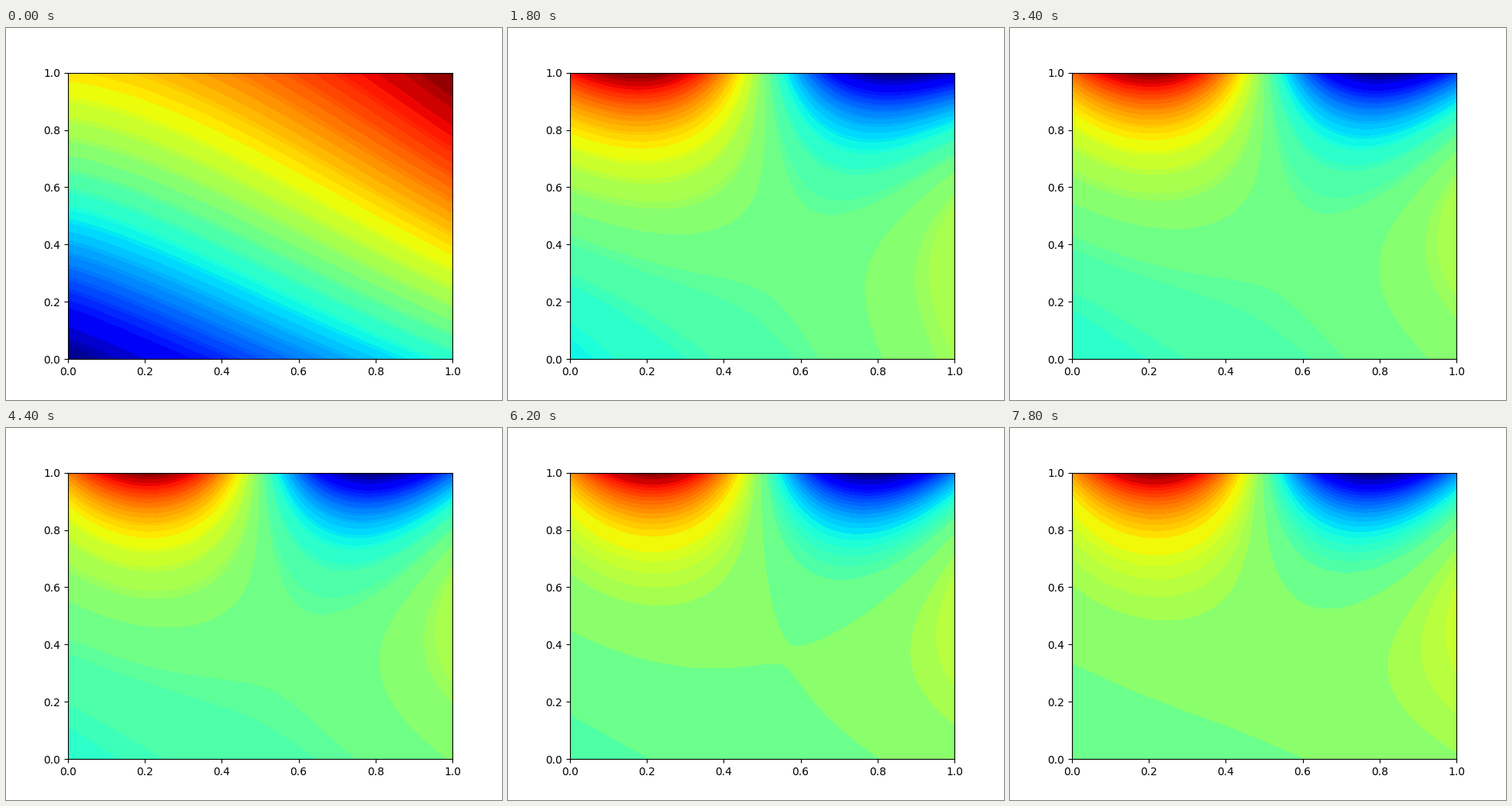
A matplotlib script that plays this animation: 640x480 px, repeating every 8 s.

```python
from itertools import groupby

import numpy as np
import matplotlib.pyplot as plt
from matplotlib.animation import FuncAnimation

STEP = 200          # ms per frame
FRAMES = 40
TILT_END = 600      # the diagonal ramp has swung round
LOBES_START = 1800  # the two lobes have formed

x, y = np.meshgrid(np.linspace(0, 1, 121), np.linspace(0, 1, 121))
t = x - .5


def diagonal():
    """Ramp rising from the lower left to the upper right corner."""
    return .8 * y - .13 * y ** 2 + (.405 - .07 * y) * x ** (.95 + .5 * y)


def sideways():
    """Ramp falling from left to right, steepest along the top."""
    left = .8 + .13 * y + .07 * y ** 2
    right = .508 - .16 * y - .35 * y ** 2
    return left + (right - left) * (1 - (1 - x) ** (1.4 - .5 * y))


def lobes(ms):
    """One sine period on the top edge that fades downwards and settles."""
    s = .47 * np.exp((LOBES_START - ms) / 1900) - .04
    late = np.clip((ms - 5200) / 2600, 0, 1)
    base = .448 + .046 * (1 - (1 - late) ** 2)

    fade = np.exp((4.8 - 2 * s) * (y - 1))
    slope = .49 + .79 * s
    wave = (.4975 - .3 * slope) / .951
    tilt = .08 + .26 * s
    twist = .1 - .2 * s

    middle = base * (1 - y ** 2) + .1 * y + (.388 + .06 * s) * y ** 2
    bowl = t ** 2 * (.03 + y ** 2 * (1 - y) - .45 * s * fade)
    lean = t * (tilt + twist * y)
    top = wave * np.sin(2 * np.pi * x) - (slope + tilt + twist) * t
    return middle + bowl + lean + fade * top


def mix(a, b, f):
    u = (1 - f) * a + f * b
    return (u - u.min()) / (u.max() - u.min())


def field(ms):
    if ms < TILT_END:
        return mix(diagonal(), sideways(), ms / TILT_END)
    if ms < LOBES_START:
        f = (ms - TILT_END) / (LOBES_START - TILT_END)
        return mix(sideways(), lobes(LOBES_START), f)
    return lobes(ms)


def bands(n):
    """Levels and colours of n jet layers, with near-equal neighbours merged."""
    rgb = plt.get_cmap("jet")(np.linspace(0, 1, n), bytes=True)[:, :3].astype(int)
    levels, colors = [-.5], []
    done = 0
    for _, group in groupby(rgb, key=lambda c: tuple(c // (32, 16, 32))):
        group = list(group)
        done += len(group)
        levels.append(done / n)
        colors.append(tuple(np.mean(group, axis=0) / 255))
    levels[-1] = 1.5
    return levels, colors


FINE, COARSE = bands(100), bands(50)

fig, ax = plt.subplots(figsize=(6.4, 4.8), dpi=100)
ax.set(xlim=(0, 1), ylim=(0, 1))


def draw(i):
    for old in list(ax.collections):
        old.remove()
    ms = i * STEP
    levels, colors = FINE if ms < 5600 else COARSE
    ax.contourf(x, y, field(ms), levels=levels, colors=colors)
    return list(ax.collections)


anim = FuncAnimation(fig, draw, frames=FRAMES, interval=STEP,
                     init_func=lambda: draw(0), repeat=True, repeat_delay=0)
plt.show()
```
